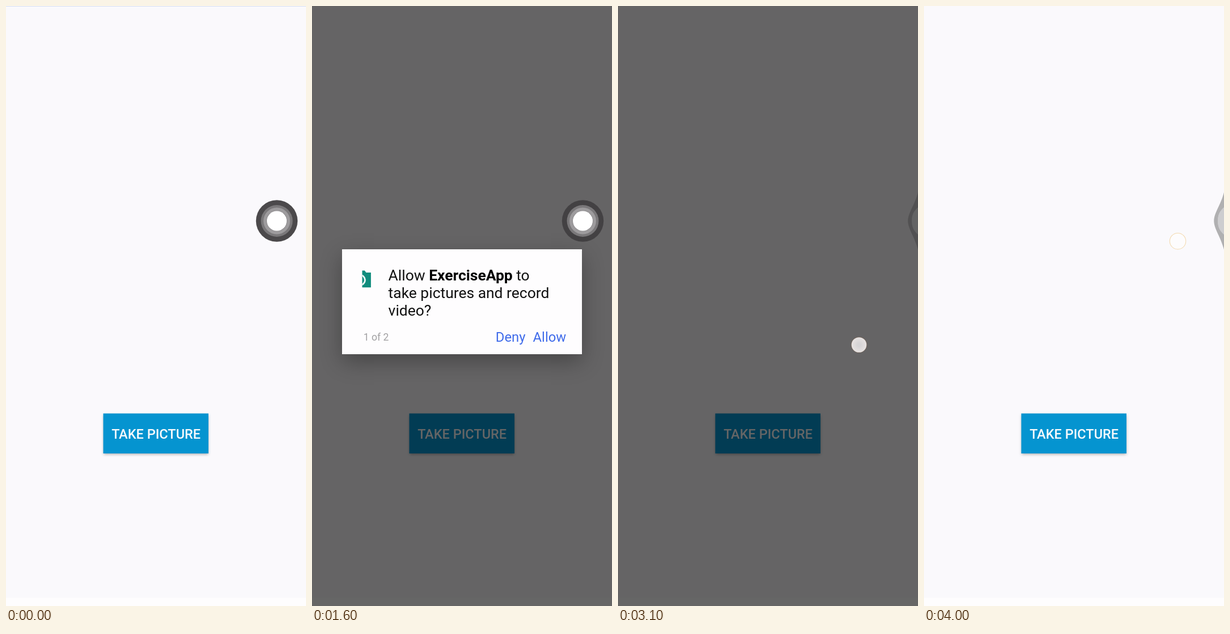
Write an HTML page with a canvas that moves like this. It is 529 px wide and 1058 px high and loops after 4100 ms.

```html
<!DOCTYPE html>
<html lang="en">
<head>
<meta charset="utf-8">
<title>Permission dialog</title>
<style>
html, body { margin: 0; width: 100%; height: 100%; overflow: hidden; background: #faf9fc; }
canvas { display: block; width: 529px; height: 1058px; }
</style>
</head>
<body>
<canvas id="stage"></canvas>
<script>
const W = 529, H = 1058, LOOP = 4100, STEP = 100;
const APP = 'ExerciseApp';
const TEAL = '#108c7d', BLUE = '#3f6bea';
const CLIP_LEFT = 88.5, CLIP_WIDTH = 364;

const canvas = document.getElementById('stage');
const dpr = window.devicePixelRatio || 1;
canvas.width = W * dpr;
canvas.height = H * dpr;
const ctx = canvas.getContext('2d');

const clamp = v => Math.min(1, Math.max(0, v));

// Linear interpolation through [time, value] pairs.
function track(t, keys) {
  if (t <= keys[0][0]) return keys[0][1];
  for (let i = 1; i < keys.length; i++) {
    const [t0, v0] = keys[i - 1], [t1, v1] = keys[i];
    if (t <= t1) return v0 + (v1 - v0) * (t - t0) / (t1 - t0);
  }
  return keys[keys.length - 1][1];
}

// Cubic Bezier easing with control points (x1, 0) and (x2, 1).
function ease(x1, x2, x) {
  let lo = 0, hi = 1, s = 0.5;
  for (let i = 0; i < 24; i++) {
    s = (lo + hi) / 2;
    const bx = 3 * s * (1 - s) ** 2 * x1 + 3 * s * s * (1 - s) * x2 + s ** 3;
    if (bx < x) lo = s; else hi = s;
  }
  return 3 * s * s * (1 - s) + s ** 3;
}

function rect(x, y, w, h, color) {
  ctx.fillStyle = color;
  ctx.fillRect(x, y, w, h);
}

function disc(x, y, r, color) {
  ctx.fillStyle = color;
  ctx.beginPath();
  ctx.arc(x, y, r, 0, Math.PI * 2);
  ctx.fill();
}

function polygon(points, color) {
  ctx.fillStyle = color;
  ctx.beginPath();
  points.forEach(([x, y]) => ctx.lineTo(x, y));
  ctx.fill();
}

function line(points, width, color) {
  ctx.strokeStyle = color;
  ctx.lineWidth = width;
  ctx.beginPath();
  points.forEach(([x, y]) => ctx.lineTo(x, y));
  ctx.stroke();
}

// Draws text and returns the x position after it.
function text(str, x, y, size, color, weight = 400) {
  ctx.font = `${weight} ${size}px Roboto, sans-serif`;
  ctx.fillStyle = color;
  ctx.fillText(str, x, y);
  return x + ctx.measureText(str).width;
}

function shadowed(color, blur, offsetY, draw) {
  ctx.save();
  ctx.shadowColor = color;
  ctx.shadowBlur = blur * dpr;
  ctx.shadowOffsetY = offsetY * dpr;
  draw();
  ctx.restore();
}

function drawPage(t) {
  rect(0, 0, W, H, '#faf9fc');
  rect(0, 1043.5, W, 15, '#fefdfe');
  if (t < 100) rect(0, 0, W, 1, '#d5e0f4');
  shadowed('rgba(0,0,0,.32)', 5, 2, () => rect(171.5, 718.5, 185.5, 70.5, '#0594d0'));
  text('TAKE PICTURE', 186.2, 762.8, 23.5, '#fafafc', 500);
}

function drawFloatingButton(x, awake) {
  disc(x, 379, 36.7, 'rgba(66,64,66,.95)');
  disc(x, 379, 28, '#7a787a');
  if (awake) {
    disc(x, 379, 23.5, '#9d9b9d');
    disc(x, 379, 18.3, '#8c8a8c');
    disc(x, 379, 17.5, '#ffffff');
  } else {
    disc(x, 379, 17.5, '#8a888a');
  }
}

function drawEdgeTab(dx) {
  const tab = (tip, half, shoulder) => {
    ctx.moveTo(530 + dx, 379 - half);
    ctx.bezierCurveTo(525 + dx, 379 - half * shoulder, tip + dx, 364, tip + dx, 379);
    ctx.bezierCurveTo(tip + dx, 394, 525 + dx, 379 + half * shoulder, 530 + dx, 379 + half);
    ctx.closePath();
  };
  ctx.beginPath();
  tab(511.3, 55, 0.55);
  tab(518, 25, 0.8);
  ctx.fillStyle = 'rgba(50,50,50,.37)';
  ctx.fill('evenodd');
  ctx.beginPath();
  tab(518, 25, 0.8);
  ctx.fillStyle = 'rgba(98,98,98,.29)';
  ctx.fill();
}

function drawAssist(t) {
  if (t < 2400) {
    drawFloatingButton(track(t, [[2100, 477.5], [2200, 494.5], [2300, 514]]), t < 2200);
  } else {
    drawEdgeTab(track(t, [[2400, 10], [2600, 0]]));
  }
}

function drawCamera() {
  polygon([[89.7, 471], [98, 471], [100, 466.5], [117, 466.5], [119.5, 470],
    [128, 470], [128, 496.3], [89.7, 496.3]], TEAL);
  polygon([[90.5, 468], [98, 466.3], [98, 468.5], [90.5, 470]], TEAL);
  ctx.strokeStyle = '#f2fbf9';
  ctx.lineWidth = 2.8;
  ctx.beginPath();
  ctx.arc(108.7, 483.3, 8.9, 0, Math.PI * 2);
  ctx.stroke();
}

function drawStorage() {
  line([[109, 466], [109, 496]], 3, TEAL);
  line([[99.5, 476], [99.5, 481.5], [109, 488]], 3, TEAL);
  line([[118, 474], [118, 481.5], [109, 488]], 3, TEAL);
  polygon([[109, 461], [113.8, 468.5], [104.2, 468.5]], TEAL);
  disc(99.5, 475.8, 3.7, TEAL);
  rect(114.5, 470.5, 7.2, 7.2, TEAL);
  disc(109, 496.5, 5, TEAL);
}

function drawMessage(icon, lines, dx) {
  ctx.save();
  ctx.beginPath();
  ctx.rect(CLIP_LEFT, 440, CLIP_WIDTH, 120);
  ctx.clip();
  ctx.translate(dx, 0);
  icon();
  let x = text('Allow ', 158.7, 483.8, 26.45, '#111');
  x = text(APP, x, 483.8, 26.45, '#000', 700);
  text(' to', x, 483.8, 26.45, '#111');
  lines.forEach((str, i) => text(str, 158.7, 514.8 + 31 * i, 26.45, '#111'));
  ctx.restore();
}

function drawDialog(t) {
  const alpha = track(t, [[100, 0], [200, 0.5], [300, 1], [2960, 1], [3080, 0]]);
  if (alpha === 0) return;
  ctx.save();
  ctx.globalAlpha = alpha;
  shadowed('rgba(0,0,0,.3)', 36, 13, () => rect(53, 429, 423, 185, '#fefdfe'));

  if (t < 1900) {
    const out = ease(0.4, 1, clamp((t - 1540) / 300));
    drawMessage(drawCamera, ['take pictures and record', 'video?'], -CLIP_WIDTH * out);
  } else if (t > 2100) {
    const left = 1 - ease(0, 0.2, clamp((t - 2164) / 300));
    drawMessage(drawStorage, ['access photos, media,', 'and files on your device?'], CLIP_WIDTH * left);
  }

  text(t < 1900 ? '1 of 2' : '2 of 2', 90.8, 590, 17.6, '#a2a1a3');
  text('Deny', 323.8, 592.3, 23.8, BLUE);
  text('Allow', 389.6, 592.3, 23.8, BLUE);
  ctx.restore();
}

function drawTouch(t) {
  if (t >= 3000 && t < 3200) {
    const glow = ctx.createRadialGradient(425, 597.5, 3, 425, 597.5, 13.5);
    glow.addColorStop(0, '#d6d4d6');
    glow.addColorStop(1, '#e8e3e2');
    disc(425, 597.5, 14.3, 'rgba(120,100,85,.6)');
    disc(425, 597.5, 13.3, glow);
  } else if (t >= 4000) {
    disc(447.5, 414.7, 14.7, '#f3d9ae');
    disc(447.5, 414.7, 13.7, '#fdfcfd');
  }
}

function render(now) {
  const t = Math.floor((now % LOOP) / STEP) * STEP;
  ctx.setTransform(dpr, 0, 0, dpr, 0, 0);
  drawPage(t);
  const dim = track(t, [[200, 0], [300, 0.104], [400, 0.42], [500, 0.596],
    [3100, 0.596], [3200, 0.38], [3300, 0.112], [3400, 0.01], [3500, 0]]);
  rect(0, 0, W, H, `rgba(0,0,0,${dim})`);
  drawAssist(t);
  drawDialog(t);
  drawTouch(t);
}

const start = performance.now();
function loop() {
  render(performance.now() - start);
  requestAnimationFrame(loop);
}
loop();
</script>
</body>
</html>
```
